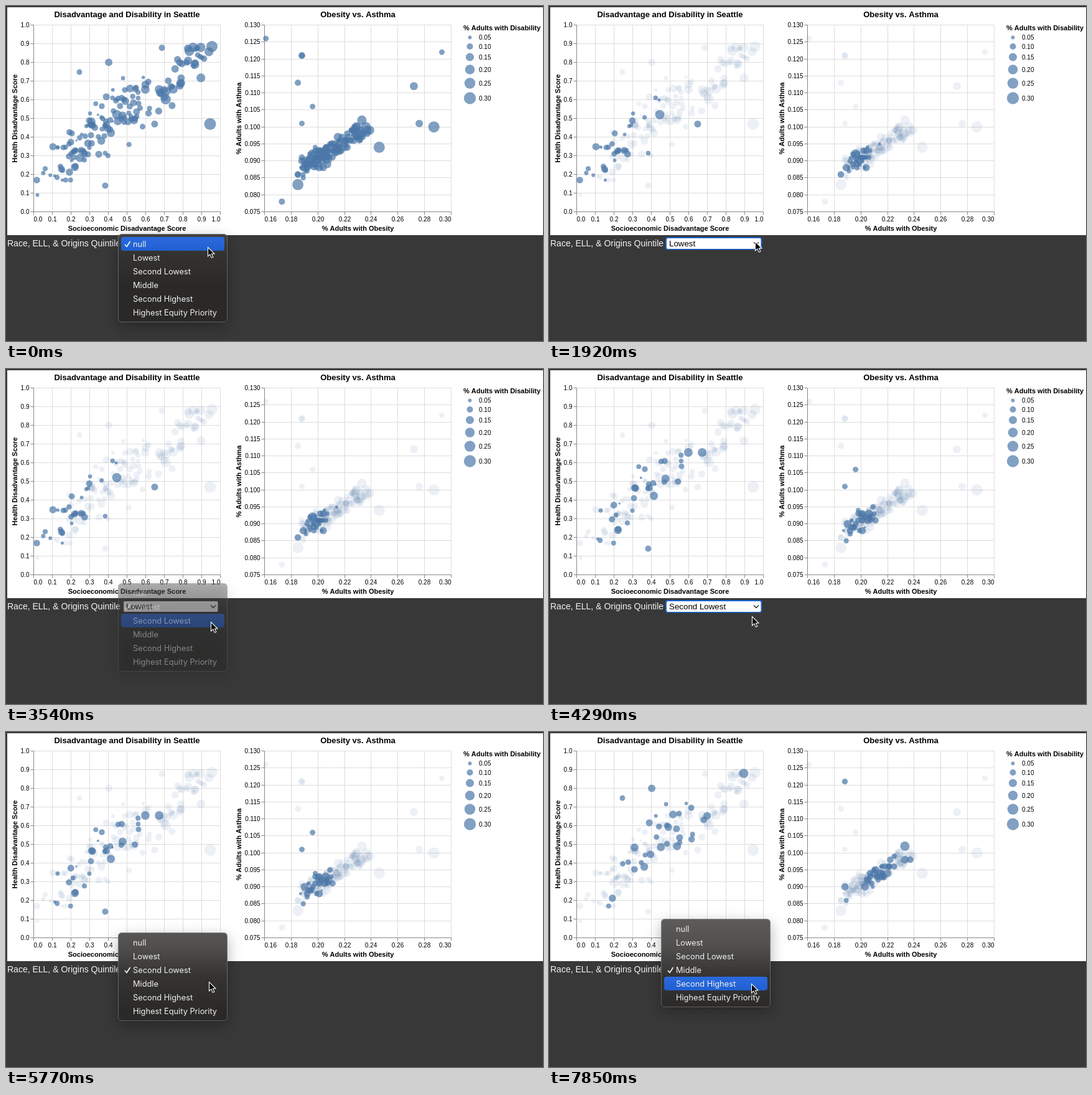
An HTML page with a canvas that plays this animation: 863 by 538 pixels, repeating every 8 s.

```html
<!DOCTYPE html>
<html lang="en">
<head>
<meta charset="utf-8">
<title>Linked scatter plots</title>
<style>
html, body { margin: 0; width: 100%; height: 100%; overflow: hidden; background: #383838; }
canvas { display: block; }
</style>
</head>
<body>
<canvas id="stage" width="863" height="538"></canvas>
<script>
const c = document.getElementById('stage').getContext('2d');
const SANS = '"Liberation Sans", Arial, sans-serif';
const MENU_FONT = '12.8px Inter, sans-serif';
const OPTIONS = ['null', 'Lowest', 'Second Lowest', 'Middle', 'Second Highest', 'Highest Equity Priority'];
const LOOP = 8000, STEP = 148;
const TOP = 30.5, BASE = 330.5, SIZE = 300;

const plots = [
  {
    left: 44.5, title: 'Disadvantage and Disability in Seattle',
    x: { title: 'Socioeconomic Disadvantage Score', n: 10, min: 0, step: .1, digits: 1 },
    y: { title: 'Health Disadvantage Score', at: 18, n: 10, min: 0, step: .1, digits: 1 }
  },
  {
    left: 415.5, title: 'Obesity vs. Asthma',
    x: { title: '% Adults with Obesity', n: 7, min: .16, step: .02, digits: 2 },
    y: { title: '% Adults with Asthma', at: 378, n: 11, min: .075, step: .005, digits: 3 }
  }
];

// Ranges per quintile: socioeconomic score, health noise, obesity, radius.
const quintiles = [
  { n: 34, score: [0, .5], noise: .16, obesity: [.184, .217], r: [1.5, 6.5] },
  { n: 32, score: [.06, .62], noise: .2, obesity: [.181, .217], r: [1.5, 7] },
  { n: 31, score: [.14, .8], noise: .26, obesity: [.184, .247], r: [2.5, 7] },
  { n: 31, score: [.16, .78], noise: .22, obesity: [.178, .23], r: [3, 7] },
  { n: 32, score: [.62, 1], noise: .16, obesity: [.206, .25], r: [3, 9] }
];

// Dots that stand out from the trend: plot, quintile, x, y, radius.
const landmarks = [
  [0, 1, .445, .52, 7.5], [0, 1, .648, .47, 5.5], [0, 2, .598, .655, 7], [0, 2, .672, .655, 7],
  [0, 2, .383, .14, 5], [0, 3, .402, .8, 6], [0, 3, .245, .748, 4.5], [0, 3, .895, .88, 7.5],
  [0, 4, .02, .09, 3], [0, 5, .945, .47, 9.5], [0, 5, .955, .885, 9],
  [1, 1, .196, .092, 7.5], [1, 2, .196, .106, 4.5], [1, 2, .188, .101, 4.5], [1, 3, .188, .121, 4.5],
  [1, 3, .233, .102, 7.5], [1, 4, .185, .083, 9], [1, 4, .173, .078, 5], [1, 5, .161, .126, 4.5],
  [1, 5, .188, .121, 5.5], [1, 5, .185, .113, 5], [1, 5, .293, .122, 4.5], [1, 5, .272, .112, 6.5],
  [1, 5, .276, .101, 6], [1, 5, .287, .1, 9], [1, 5, .246, .094, 9]
];

let seed = 11;
function random() {
  seed = (seed * 1664525 + 1013904223) % 4294967296;
  return seed / 4294967296;
}
const mid = () => (random() + random()) / 2;
const lerp = ([a, b], k) => a + (b - a) * k;
const round = v => Math.round(v * 1000) / 1000;

const dots = landmarks.map(([plot, group, x, y, r]) => ({ plot, group, x, y, r }));
quintiles.forEach((q, i) => {
  for (let k = 0; k < q.n; k++) {
    const u = mid(), r = lerp(q.r, mid()), group = i + 1;
    const score = lerp(q.score, u);
    const health = Math.min(.95, Math.max(.17, .16 + .75 * score + q.noise * (2 * mid() - 1)));
    const obesity = round(lerp(q.obesity, u * .7 + random() * .3));
    const asthma = round(.0876 + .244 * (obesity - .188) + .004 * (2 * mid() - 1));
    dots.push({ plot: 0, group, x: score, y: health, r }, { plot: 1, group, x: obesity, y: asthma, r });
  }
});

// Each visit to the menu, in steps: opened, clicked, chart updated. Each picks the next option.
const visits = [
  { open: 0, click: 4, done: 6 },
  { open: 15, click: 23, done: 26 },
  { open: 32, click: 39, done: 42 },
  { open: 50, click: 99, done: 99 }
];

// Pointer path: step, x, y
const path = [
  [0, 324, 387], [2, 319, 407], [8, 319, 407], [13, 331, 378], [16, 331, 378], [21, 329, 406], [28, 329, 406],
  [30, 323, 388], [32, 323, 388], [33, 326, 384], [34, 326, 384], [38, 326, 401], [42, 326, 401],
  [45, 326, 387], [48, 325, 381], [50, 325, 381], [53, 325, 404]
];

function pointer(step) {
  let i = 0;
  while (i < path.length - 2 && path[i + 1][0] <= step) i++;
  const [s0, x0, y0] = path[i], [s1, x1, y1] = path[i + 1];
  const k = Math.min(1, (step - s0) / (s1 - s0));
  return [lerp([x0, x1], k), lerp([y0, y1], k)];
}

function text(s, x, y, font, align = 'left', color = '#000') {
  c.font = font;
  c.textAlign = align;
  c.fillStyle = color;
  c.fillText(s, x, y);
}

function line(color, width, ...pts) {
  c.strokeStyle = color;
  c.lineWidth = width;
  c.beginPath();
  for (let i = 0; i < pts.length; i += 2) c.lineTo(pts[i], pts[i + 1]);
  c.stroke();
}

function box(x, y, w, h, r) {
  c.beginPath();
  c.roundRect(x, y, w, h, r);
}

function dot(x, y, r, opacity) {
  c.fillStyle = `rgba(76,120,168,${opacity})`;
  c.beginPath();
  c.arc(x, y, r, 0, 7);
  c.fill();
}

function axes({ left, title, x, y }) {
  const right = left + SIZE;
  const xAt = i => Math.floor(left + SIZE * i / x.n) + .5;
  const yAt = i => Math.floor(BASE - SIZE * i / y.n) + .5;
  const label = (a, i) => (a.min + a.step * i).toFixed(a.digits);
  for (let i = 0; i <= x.n; i++) line('#ddd', 1, xAt(i), TOP, xAt(i), BASE);
  for (let i = 0; i <= y.n; i++) line('#ddd', 1, left, yAt(i), right, yAt(i));
  for (let i = 0; i <= x.n; i++) {
    line('#888', 1, xAt(i), BASE, xAt(i), BASE + 5);
    const align = i === 0 ? 'left' : i === x.n ? 'right' : 'center';
    text(label(x, i), xAt(i), 346, '10px ' + SANS, align);
  }
  for (let i = 0; i <= y.n; i++) {
    line('#888', 1, left - 5, yAt(i), left, yAt(i));
    text(label(y, i), left - 7, yAt(i) + 3.5, '10px ' + SANS, 'right');
  }
  line('#888', 1, left, TOP, left, BASE, right, BASE);
  text(title, left + 150, 18, 'bold 13px ' + SANS, 'center');
  text(x.title, left + 150, 360.5, 'bold 11px ' + SANS, 'center');
  c.save();
  c.translate(y.at, 180.5);
  c.rotate(-Math.PI / 2);
  text(y.title, 0, 0, 'bold 11px ' + SANS, 'center');
  c.restore();
}

function charts(selected) {
  c.fillStyle = '#fff';
  c.fillRect(2, 2, 861, 366);
  plots.forEach(axes);
  for (const d of dots) {
    const { left, x, y } = plots[d.plot];
    const px = left + SIZE * (d.x - x.min) / (x.n * x.step);
    const py = BASE - SIZE * (d.y - y.min) / (y.n * y.step);
    dot(px, py, d.r, selected === 0 || selected === d.group ? .7 : .1);
  }
  text('% Adults with Disability', 735, 39, 'bold 11px ' + SANS);
  [50.5, 65, 82, 102, 124, 148].forEach((y, i) => {
    dot(745.5, y, 9.7 * Math.sqrt((i + .5) / 5.5), .7);
    text((.05 * (i + 1)).toFixed(2), 760, y + 3.5, '10px ' + SANS);
  });
}

function selectBox(value, focused) {
  text('Race, ELL, & Origins Quintile', 2, 386, '14px ' + SANS, 'left', '#f2f2f2');
  if (focused) {
    c.fillStyle = '#1a63d0';
    box(187, 371, 155.5, 20.5, 4);
    c.fill();
  }
  c.fillStyle = '#fff';
  box(189, 373, 151.5, 17, 2);
  c.fill();
  text(OPTIONS[value], 193, 386, '13.33px ' + SANS);
  line('#222', 1.3, 329, 379.5, 333, 383.5, 337, 379.5);
}

function menu(checked, hot, alpha) {
  const top = 366 - 22 * checked;
  c.save();
  c.globalAlpha = alpha;
  const shade = c.createLinearGradient(0, 300, 0, 450);
  shade.addColorStop(0, '#5d5c5b');
  shade.addColorStop(.3, '#504f4e');
  shade.addColorStop(.6, '#353433');
  shade.addColorStop(1, '#2a2928');
  c.shadowColor = 'rgba(0,0,0,.3)';
  c.shadowBlur = 22;
  c.shadowOffsetY = 7;
  c.fillStyle = shade;
  box(180, top, 176, 142, 6);
  c.fill();
  c.shadowColor = 'transparent';
  c.strokeStyle = 'rgba(255,255,255,.25)';
  c.lineWidth = 1;
  box(180.5, top + .5, 175, 141, 5.5);
  c.stroke();
  if (hot >= 0) {
    const y = top + 5 + 22 * hot;
    const blue = c.createLinearGradient(0, y, 0, y + 22);
    blue.addColorStop(0, '#2a6ade');
    blue.addColorStop(1, '#1f5fd0');
    c.fillStyle = blue;
    box(185, y, 166, 22, 4);
    c.fill();
  }
  OPTIONS.forEach((s, i) => text(s, 204, top + 21 + 22 * i, MENU_FONT, 'left', '#f0f0f0'));
  line('#fff', 1.6, 191, 383, 194, 386.5, 199.5, 378);
  c.restore();
}

function arrow(x, y) {
  c.save();
  c.translate(x, y);
  c.beginPath();
  [[.5, .5], [.5, 15], [3.8, 11.9], [6.3, 17.4], [8.8, 16.3], [6.4, 11], [11, 11]].forEach(p => c.lineTo(...p));
  c.closePath();
  c.fillStyle = '#000';
  c.fill();
  c.strokeStyle = '#fff';
  c.lineWidth = 1.1;
  c.stroke();
  c.restore();
}

function draw(now) {
  const step = Math.min(53, Math.floor((now % LOOP + 15) / STEP));
  const [x, y] = pointer(step);
  const from = visits.findLastIndex(v => v.open <= step);
  const { click, done } = visits[from];
  const open = step < done;
  const value = open ? from : from + 1;

  c.fillStyle = '#383838';
  c.fillRect(0, 0, 863, 538);
  charts(value);
  selectBox(value, !open);
  if (open) {
    // The clicked row blinks off once, then the menu fades.
    const since = step - click;
    const hot = since === 0 ? -1 : from + Math.floor((y - 371) / 22);
    menu(from, hot, [1, .45, .1][Math.max(0, since)]);
  }
  arrow(x, y);
  requestAnimationFrame(draw);
}
requestAnimationFrame(draw);
</script>
</body>
</html>
```
